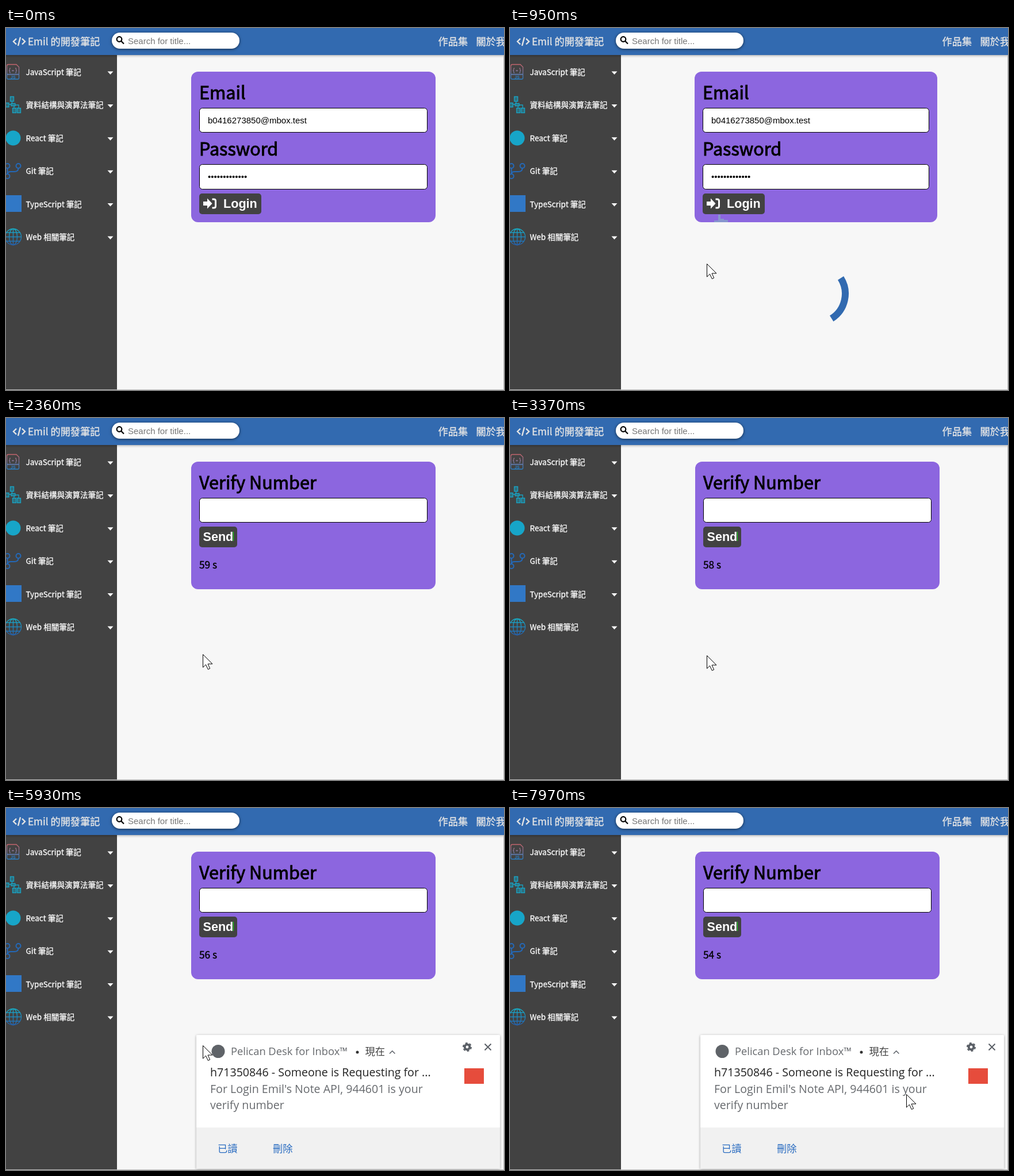
An HTML page that plays this animation: 866x630 px, repeating every 8 s.

```html
<!DOCTYPE html>
<html lang="zh-Hant">
<head>
<meta charset="utf-8">
<title>Login with verify number</title>
<style>
html, body { margin: 0; width: 100%; height: 100%; overflow: hidden; background: #f7f7f7; }
svg { display: block; --w: 425px; }
text { white-space: pre; }
.cjk { font-family: "Noto Sans CJK TC", "Noto Sans CJK", "Noto Sans CJK JP", sans-serif; }
.mid { font-weight: 500; fill: currentColor; stroke: currentColor; stroke-width: .02em; }
.arial { font-family: "Liberation Sans", Arial, sans-serif; font-size: 15px; }
.note { font-family: "Open Sans", "Noto Sans", sans-serif; font-size: 19.6px; }
.label { font-size: 30.6px; color: #000; stroke-width: .03em; }
.button { font-size: 21.6px; font-weight: bold; fill: #fff; }
.panel { fill: #8c66df; width: var(--w); }
.field { fill: #fff; stroke: #000; width: calc(var(--w) - 29px); }
.dark { fill: #424242; }
.pill { fill: #fff; filter: drop-shadow(0 1px 2.5px #0009); }
</style>
</head>
<body>
<svg width="866" height="630" viewBox="0 0 866 630">
  <defs>
    <linearGradient id="warm" x2="0" y2="1"><stop stop-color="#c4646c"/><stop offset="1" stop-color="#2a7fc4"/></linearGradient>
    <linearGradient id="cool" x2="0" y2="1"><stop stop-color="#17adc6"/><stop offset="1" stop-color="#2463b4"/></linearGradient>
    <filter id="soft" x="-10%" y="-20%" width="120%" height="160%"><feDropShadow dx="0" dy="1" stdDeviation="2" flood-opacity=".35"/></filter>
  </defs>
  <rect width="866" height="630" fill="#f7f7f7"/>

  <g id="login">
    <rect class="panel" x="322" y="76" height="262" rx="12"/>
    <text class="cjk mid label" x="336" y="124">Email</text>
    <rect class="field" x="336.5" y="139.5" height="42" rx="5"/>
    <text class="arial" x="351" y="166">b0416273850@mbox.test</text>
    <text class="cjk mid label" x="336" y="222">Password</text>
    <rect class="field" x="336.5" y="237.5" height="43" rx="5"/>
    <text id="dots" class="arial" x="351" y="264"></text>
    <rect class="dark" x="336" y="288" width="108" height="36" rx="5"/>
    <path d="M343 302h7v-5.5l8.5 9-8.5 9v-5.5h-7z" fill="#fff"/>
    <path d="M358.5 298h3q3 0 3 3v9q0 3-3 3h-3" fill="none" stroke="#fff" stroke-width="3"/>
    <text class="arial button" x="378" y="313">Login</text>
    <path id="trace" d="M363 325h4v7h6v2h7v4h-24v-3h7z" fill="#869fcb" opacity=".85"/>
  </g>

  <g id="verify">
    <rect class="panel" x="322" y="76" height="222" rx="12"/>
    <text class="cjk mid label" x="336" y="124">Verify Number</text>
    <rect class="field" x="336.5" y="139.5" height="42" rx="5"/>
    <rect class="dark" x="336" y="189" width="66" height="36" rx="5"/>
    <text class="arial button" x="342.5" y="214">Send</text>
    <path d="M395.5 198v16" stroke="#1be01b"/>
    <text id="timer" class="cjk mid" x="336" y="262" font-size="17.3"></text>
  </g>

  <path id="spinner" d="M36.06-36.06A51 51 0 0 1 36.06 36.06" fill="none" stroke="#316ab0" stroke-width="12"/>

  <rect class="dark" y="40" width="193" height="590"/>
  <g id="menu" class="cjk" font-size="13.5" color="#fff"></g>
  <g fill="none" stroke-width="1.3">
    <path stroke="url(#warm)" d="M4 63.5h14l4.500 4.500v19q0 2-2 2h-16.500q-2.500 0-2.500-2v-21q0-2.500 2.500-2.500zM2 80.500h20v.6h-20zM8 70q-2 0-1.500 2 0 2-1.500 2 1.500 0 1.500 2-.5 2 1.500 2M16 70q2 0 1.500 2 0 2 1.500 2-1.500 0-1.500 2 .5 2-1.500 2M11 74h2v.5h-2z"/>
    <text x="8" y="88" font-size="7" font-weight="bold" fill="#2a7fc4" font-family="Liberation Sans, sans-serif">JS</text>
    <g stroke="#18a3c4" fill="#18a3c4" fill-opacity=".45">
      <path d="M7.5 119.5h6v8h-6zM-2 130.5h7v7h-7zM11.5 139.5h6v8h-6zM19.5 139.5h6v8h-6zM9 131.5h7v4h-7z"/>
      <path d="M10.5 128v3M14 136v3M16 134h6v5M5 133h4" fill="none"/>
    </g>
    <g stroke="#2469b8" stroke-width="2">
      <circle cx="2.5" cy="240" r="4"/><circle cx="21.5" cy="240" r="4"/><circle cx="2.5" cy="258" r="4"/>
      <path d="M2.5 244v10M21.5 244q0 6-7 6h-6q-6 0-6 4"/>
    </g>
    <g stroke="url(#cool)">
      <circle cx="12.5" cy="363.5" r="14"/><ellipse cx="12.5" cy="363.5" rx="7" ry="14"/>
      <path d="M12.5 349.5v28h.1M-1 363.5h27v.1M1 356h23v.1M1 371h23v.1"/>
    </g>
  </g>
  <circle cx="12.5" cy="191.5" r="13" fill="#17a5c8"/>
  <rect y="291" width="27" height="29" fill="#3178c6"/>

  <rect x="-9" y="-9" width="884" height="56" fill="#316ab0" filter="url(#soft)"/>
  <path d="M18 18.5l-5 5 5 5M28 18.5l5 5-5 5M25 16l-4 15" fill="none" stroke="#e4e4e4" stroke-width="2.4"/>
  <g class="cjk" font-size="17.2" color="#e4e4e4">
    <text class="mid" x="38" y="29.5">Emil 的開發筆記</text>
    <text class="mid" x="751.5" y="29.5">作品集</text>
    <text class="mid" x="817.5" y="29.5">關於我</text>
  </g>
  <rect class="pill" x="184" y="8" width="222" height="28" rx="14"/>
  <g fill="none" stroke="#000" stroke-width="2.2"><circle cx="197" cy="19.5" r="4.3"/><path d="M200 22.5l5 5"/></g>
  <text class="arial" x="212" y="28" fill="#757575">Search for title...</text>

  <g id="toast">
    <rect x="331" y="395" width="528" height="233" rx="2" fill="#fff" filter="url(#soft)"/>
    <rect x="331" y="556" width="528" height="72" fill="#f1f1f1"/>
    <circle cx="369" cy="423.5" r="11.5" fill="#5f6368"/>
    <g class="note" fill="#66696d">
      <text x="391" y="430" style="font-size:18.3px">Pelican Desk for Inbox™</text>
      <text x="355" y="467" fill="#222">h71350846 - Someone is Requesting for ...</text>
      <text x="355" y="496">For Login Emil's Note API, 944601 is your</text>
      <text x="355" y="524">verify number</text>
    </g>
    <circle cx="611" cy="425" r="2.5" fill="#333"/>
    <g class="cjk" font-size="17.3">
      <text x="624.5" y="430" fill="#444">現在</text>
      <text x="368" y="599" fill="#2a6cc0">已讀</text>
      <text x="464" y="599" fill="#2a6cc0">刪除</text>
    </g>
    <g fill="none" stroke="#5a5f66">
      <path d="M667 427.5l4.7-4.7 4.7 4.7" stroke-width="1.5"/>
      <path d="M832.5 410.5l11 11M843.5 410.5l-11 11" stroke-width="1.9"/>
      <circle cx="802" cy="416" r="4.3" stroke-width="3.8"/>
      <circle cx="802" cy="416" r="7" stroke-width="2" stroke-dasharray="4 3.33"/>
    </g>
    <rect x="797" y="453" width="34" height="27" fill="#e64c3c"/>
  </g>

  <path d="M865.5 47v582.5H0" fill="none" stroke="#bdbdbd"/>
  <g id="pointer" fill="#fff" stroke="#000">
    <path id="arrow" d="M.5 .5v22.5l5-4.8 3.8 8.3 3.4-1.5-3.7-8h8z"/>
    <path id="hand" d="M-2 2q0-2 2-2t2 2v8q12 0 13 4v6l-3 7h-11l-8-10q0-3 3-2l2 2z"/>
  </g>
</svg>
<script>
const $ = id => document.getElementById(id);
const LOOP = 8000, VERIFY = 1420;
const ticks = [2360, 3370, 4360, 5400, 6370, 7360];

// pointer path: time, x, y
const path = [
  [60, 364, 312], [200, 364, 318], [330, 358, 430], [520, 350, 556], [810, 342, 410],
  [950, 342, 410], [1010, 342, 411], [2360, 342, 411], [2560, 342, 413],
  [6240, 342, 413], [6630, 342, 428], [6950, 342, 428], [7130, 440, 540],
  [7280, 570, 559], [7440, 687, 505], [7580, 670, 440], [7730, 612, 428],
  [7800, 610, 460], [7860, 635, 490], [7930, 691, 494], [7970, 689, 498], [LOOP, 689, 498]
];

const names = ["JavaScript 筆記", "資料結構與演算法筆記", "React 筆記", "Git 筆記", "TypeScript 筆記", "Web 相關筆記"];
$("menu").innerHTML = names.map((name, i) => {
  const y = 77 + 57.4 * i;
  return `<text class="mid" x="34.5" y="${y + 5}">${name}</text>
    <path d="M176.5 ${y - 1.5}h10l-5 5.5z" fill="#fff"/>`;
}).join("");
$("dots").textContent = "•".repeat(13);

const show = (id, on) => $(id).style.display = on ? "" : "none";
const move = (id, x, y, extra = "") => $(id).setAttribute("transform", `translate(${x} ${y})${extra}`);

function pointAt(t) {
  const i = Math.max(1, path.findIndex(p => p[0] > t));
  const [t0, x0, y0] = path[i - 1], [t1, x1, y1] = path[i];
  const k = Math.max(0, (t - t0) / (t1 - t0));
  return [x0 + (x1 - x0) * k, y0 + (y1 - y0) * k];
}

function draw(t) {
  const loading = t >= 130 && t < VERIFY;
  show("login", t < VERIFY);
  show("verify", t >= VERIFY);
  show("spinner", loading);
  show("trace", loading);
  document.querySelector("svg").style.setProperty("--w", loading ? "422px" : "425px");
  move("login", loading ? -1 : 0, 0);
  move("spinner", 532, 462.5, ` rotate(${12 + 0.731 * (t - 950)})`);
  $("timer").textContent = `${60 - ticks.filter(k => t >= k).length} s`;

  const p = 1 - (1 - Math.min(1, Math.max(0, (t - 5660) / 260))) ** 3;
  show("toast", t >= 5720);
  move("toast", 535 * (1 - p), 0);
  $("toast").style.opacity = p;

  show("pointer", t >= 60);
  show("hand", t < 210);
  show("arrow", t >= 210);
  move("pointer", ...pointAt(t));
}

function frame() {
  draw(performance.now() % LOOP);
  requestAnimationFrame(frame);
}
frame();
</script>
</body>
</html>
```
